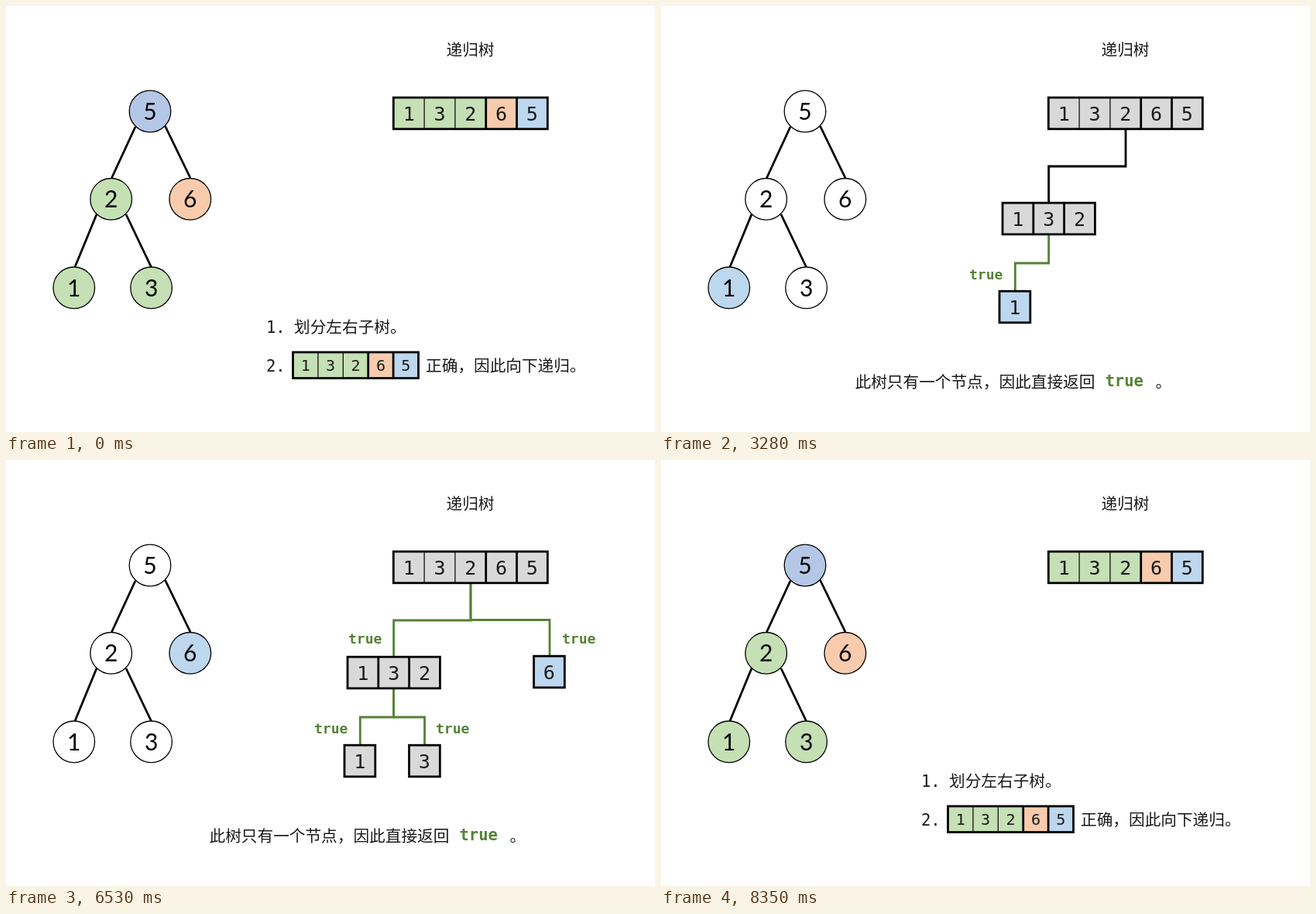
Write an HTML page that moves like this. It is 838 px wide and 550 px high and loops after 9 s.

```html
<!DOCTYPE html>
<html lang="zh-CN">
<head>
<meta charset="utf-8">
<style>
  html, body { margin: 0; width: 100%; height: 100%; overflow: hidden; background: #fff; }
  svg { display: block; width: 100%; height: 100%; }
  text { white-space: pre; font: 300 20.67px "Noto Sans CJK SC", "Noto Sans CJK", sans-serif; fill: #1a1a1a; }
  .node { font: 30px Lato, sans-serif; text-anchor: middle; fill: #000; }
  .cell { font-family: "DejaVu Sans Mono", monospace; text-anchor: middle; }
  .num { font: 20.5px "DejaVu Sans Mono", monospace; }
  .true { font: bold 20.5px "DejaVu Sans Mono", monospace; fill: #548235; }
  .label { font-size: 18px; }
  .comma { font-weight: bold; fill: #548235; }
  path { fill: none; stroke-width: 2.8; }
</style>
</head>
<body>
<svg id="stage" viewBox="0 0 838 550"></svg>
<script>
const GREEN = '#c5e0b4', ORANGE = '#f8cbad', BLUE = '#bdd7ee', ROOT = '#b4c7e7',
      GRAY = '#d9d9d9', WHITE = '#fff', BLACK = '#000', OK = '#548235';
const nodes = { 5: [186, 136], 2: [135.7, 249.3], 6: [237.8, 249.3], 1: [87.8, 363.8], 3: [187.6, 363.8] };

const text = (x, y, s, cls = '') => `<text x="${x}" y="${y}" class="${cls}">${s}</text>`;
const line = (d, color = BLACK) => `<path d="${d}" stroke="${color}"/>`;
const label = (x, y) => text(x, y, 'true', 'true label');

function tree(fills = {}) {
  const edges = line('M167 156L136.5 222M205.5 155L238 222M117 269L89 337M155 269L187.5 337');
  return edges + Object.entries(nodes).map(([n, [x, y]]) =>
    `<circle cx="${x}" cy="${y}" r="26.8" fill="${fills[n] || WHITE}" stroke="#000" stroke-width="1.3"/>` +
    text(x, y + 11, n, 'node')).join('');
}

// A row of digit cells; the first `thin` dividers are hairlines.
function array(x, y, digits, fills, { w = 39.8, h = 40.6, size = 25, thin = 0 } = {}) {
  let out = '';
  [...digits].forEach((d, i) => {
    const left = x + i * w;
    out += `<rect x="${left}" y="${y}" width="${w}" height="${h}" fill="${Array.isArray(fills) ? fills[i] : fills}"/>` +
      `<text x="${left + w / 2}" y="${y + h / 2 + size * .365}" class="cell" style="font-size:${size}px">${d}</text>`;
  });
  for (let i = 1; i < digits.length; i++)
    out += `<path d="M${x + i * w} ${y}v${h}" stroke="#000" style="stroke-width:${i <= thin ? 1.2 : 2.8}"/>`;
  return out + `<rect x="${x}" y="${y}" width="${w * digits.length}" height="${h}" fill="none" stroke="#000" stroke-width="2.8"/>`;
}

const rootFills = [GREEN, GREEN, GREEN, ORANGE, BLUE];
const leftFills = [GREEN, ORANGE, BLUE];
const rootArray = fills => array(500.3, 118.2, '13265', fills, { thin: 2 });
const leftArray = fills => array(441, 254.2, '132', fills);
const box1 = fill => array(437, 368.2, '1', fill);
const box3 = fill => array(520.5, 368.2, '3', fill);
const box6 = fill => array(681.5, 253.2, '6', fill);

const linkLeft = color => line('M600 160V207H500.6V254', color);
const linkRight = color => line('M600 160V206.5H702V253', color);
const link1 = line('M500.6 296V332H457.3V368', OK) + label(398, 352.5);
const link3 = line('M500.6 296V332H540.5V368', OK) + label(555, 352.5);
const leftTrue = label(442, 236.5), rightTrue = label(718, 236.5);

function steps(dx, dy, digits, fills, thin) {
  const end = 370.5 + digits.length * 32.4;
  return text(336 + dx, 421.5 + dy, '1.', 'num') + text(372 + dx, 422 + dy, '划分左右子树。') +
    text(336 + dx, 471.5 + dy, '2.', 'num') +
    array(370.5 + dx, 447 + dy, digits, fills, { w: 32.4, h: 33.5, size: 20, thin }) +
    text(end + dx + 9.5, 472 + dy, '正确，因此向下递归。');
}
const single = x => text(x, 492.5, '此树只有一个节点，因此直接返回') +
  text(x + 323, 491, 'true', 'true') + text(x + 388, 492.5, '。');

const scenes = [
  [0, tree({ 5: ROOT, 2: GREEN, 6: ORANGE, 1: GREEN, 3: GREEN }) + rootArray(rootFills) +
    steps(0, 0, '13265', rootFills, 2)],
  [1260, tree() + rootArray(WHITE)],
  [2270, tree({ 2: BLUE, 1: GREEN, 3: ORANGE }) + linkLeft(BLACK) + rootArray(GRAY) + leftArray(leftFills) +
    steps(32, -8, '132', leftFills, 0)],
  [3280, tree({ 1: BLUE }) + linkLeft(BLACK) + link1 + rootArray(GRAY) + leftArray(GRAY) +
    box1(BLUE) + single(250.5)],
  [4300, tree({ 3: BLUE }) + linkLeft(BLACK) + link1 + link3 + rootArray(GRAY) + leftArray(GRAY) +
    box1(GRAY) + box3(BLUE) + single(250.5)],
  [5310, tree({ 6: BLUE }) + linkLeft(OK) + linkRight(BLACK) + leftTrue + link1 + link3 +
    rootArray(GRAY) + leftArray(GRAY) + box1(GRAY) + box3(GRAY) + box6(BLUE) +
    text(262.5, 492.5, '回溯并向下递归。')],
  [6280, tree({ 6: BLUE }) + linkLeft(OK) + linkRight(OK) + leftTrue + rightTrue + link1 + link3 +
    rootArray(GRAY) + leftArray(GRAY) + box1(GRAY) + box3(GRAY) + box6(BLUE) + single(262.5)],
  [7260, tree() + line('M600 82V115', OK) + label(540, 91.5) + linkLeft(OK) + linkRight(OK) +
    leftTrue + rightTrue + link1 + link3 + rootArray(rootFills) + leftArray(leftFills) +
    box1(BLUE) + box3(BLUE) + box6(BLUE) + text(262.5, 492.5, '返回') + text(316.5, 491, 'true', 'true') +
    text(380, 492.5, '，', 'comma') + text(401, 492.5, '代表此后序遍历满足二叉搜索树定义。')],
];
scenes.push([8270, scenes[0][1]]);

const stage = document.getElementById('stage');
const title = text(568.5, 64, '递归树');
let shown;
function draw() {
  const t = performance.now() % 9000;
  const picture = scenes.filter(([start]) => start <= t).pop()[1];
  if (picture !== shown) stage.innerHTML = title + (shown = picture);
  requestAnimationFrame(draw);
}
draw();
</script>
</body>
</html>
```
